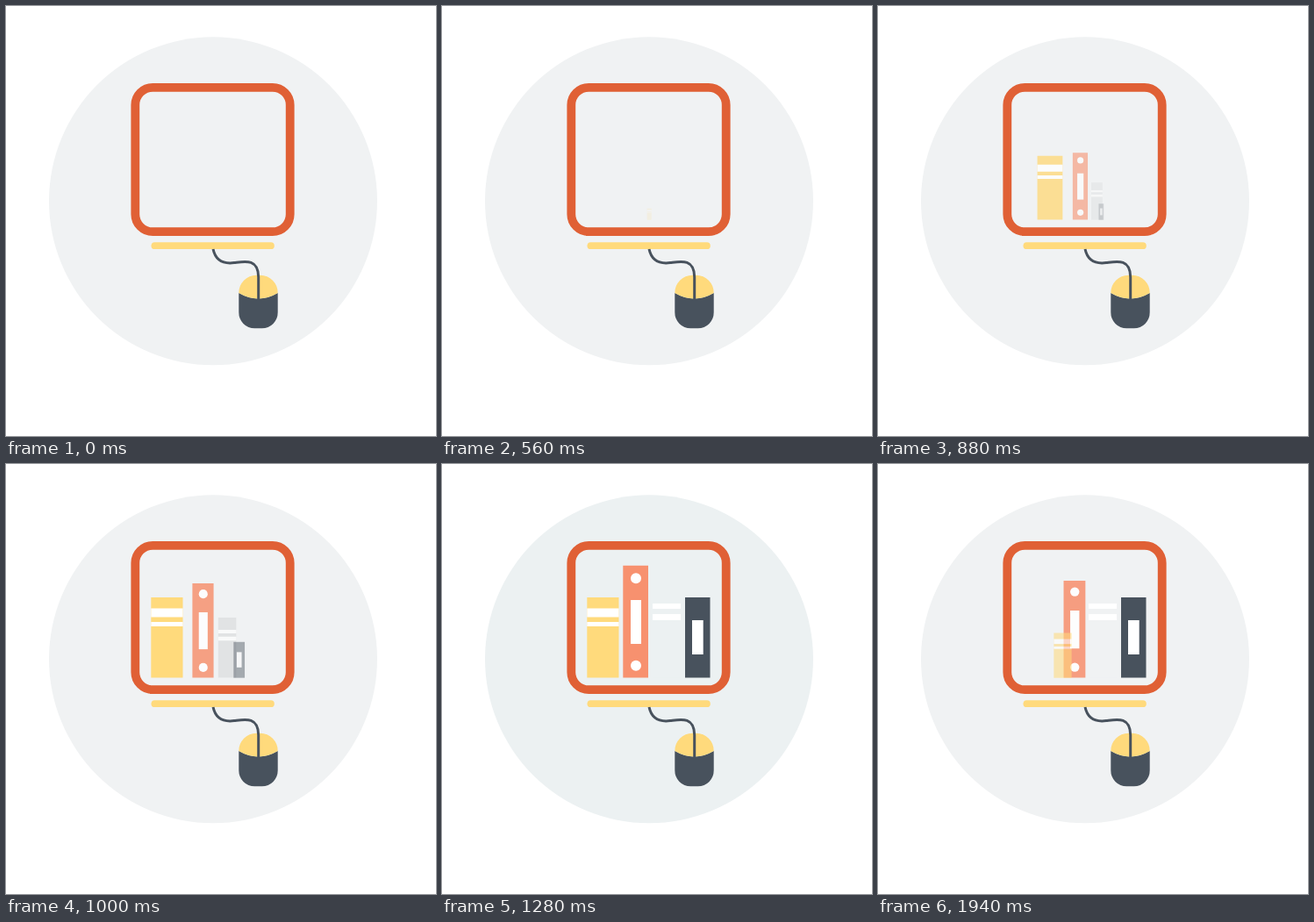
An HTML page for the animation above (1980 ms loop, 490 by 490 pixels).

```html
<!DOCTYPE html>
<html lang="en">
<head>
<meta charset="utf-8">
<title>Online bookshelf</title>
<style>
html, body { margin: 0; width: 100%; height: 100%; overflow: hidden; background: #fff; }
svg { display: block; width: 100%; height: 100%; }
</style>
</head>
<body>
<svg viewBox="0 0 490 490">
  <circle id="disc" cx="236" cy="222.3" r="187"/>
  <rect x="147.3" y="92.8" width="176.4" height="164.4" rx="20" fill="none" stroke="#e06035" stroke-width="9.8"/>

  <g fill="#fff">
    <g id="pale">
      <path id="paleCover" d="M240 137h32v106.5h-32z"/>
      <path d="M240 159h32v6h-32zM240 171h32v7h-32z"/>
    </g>
    <g id="dark">
      <path fill="#48525d" d="M277 152h28.5v91.5h-28.5z"/>
      <path d="M285 178h12.7v39h-12.7z"/>
    </g>
    <g id="coral">
      <path fill="#f7916f" d="M206.3 115.8h28.7v127.7h-28.7z"/>
      <path d="M215 155h12v50h-12z"/>
      <circle cx="221" cy="130.3" r="6"/>
      <circle cx="221" cy="229.7" r="6"/>
    </g>
    <g id="gold">
      <path fill="#ffda7c" d="M165.3 152h36.2v91.5h-36.2z"/>
      <path d="M165.3 164.5h36.2v10h-36.2zM165.3 180h36.2v5h-36.2z"/>
    </g>
  </g>

  <rect x="165.5" y="269.3" width="140.3" height="7.8" rx="3.9" fill="#ffda7c"/>
  <path fill="#48525d" d="M265.3 327Q287.5 340 309.7 327V349A18 18 0 0 1 291.7 367.3H283.3A18 18 0 0 1 265.3 349Z"/>
  <path fill="#ffda7c" d="M265.3 327A20 20 0 0 1 285.3 306.7H289.7A20 20 0 0 1 309.7 327Q287.5 340 265.3 327Z"/>
  <path id="click" fill="#f5e6c0" d="M265.3 327A20 20 0 0 1 285.3 306.7H287.5V333.5Q275 333 265.3 327Z"/>
  <path fill="none" stroke="#48525d" stroke-width="3" d="M236 277C239 291 249 294 260 292.6S287.7 287 287.7 309V334"/>
</svg>
<script>
const LOOP = 1980, GROW = 490, SHRINK = 482;
const $ = id => document.getElementById(id);
const clamp = v => Math.max(0, Math.min(1, v));
const books = ['gold', 'coral', 'pale', 'dark'].map($);

// The picture advances every 40 ms, with one long rest on the full shelf.
function step(t) {
  if (t < 1280) return t - t % 40;
  return t < 1740 ? 1280 : t - (t - 1740) % 40;
}

function draw(t) {
  const sizes = books.map((book, i) => {
    const size = clamp((t - 490 - 97 * i) / GROW) - clamp((t - 1728 - 147 * i) / SHRINK);
    // Books grow out of one point at the bottom of the frame.
    book.setAttribute('transform', `translate(245 243.8) scale(${size}) translate(-245 -243.8)`);
    book.setAttribute('opacity', size);
    return size;
  });
  const disc = t >= 1160 && t < 1900 ? [236, 241, 242] : [240, 242, 243];
  const shade = 22 * clamp((1 - sizes[2]) * 4);
  $('disc').setAttribute('fill', `rgb(${disc})`);
  $('paleCover').setAttribute('fill', `rgb(${disc.map(c => c - shade)})`);
  $('click').setAttribute('opacity', clamp(1 - Math.abs(t - 360) / 120));
}

const start = performance.now();
function frame() {
  draw(step((performance.now() - start) % LOOP));
  requestAnimationFrame(frame);
}
frame();
</script>
</body>
</html>
```
